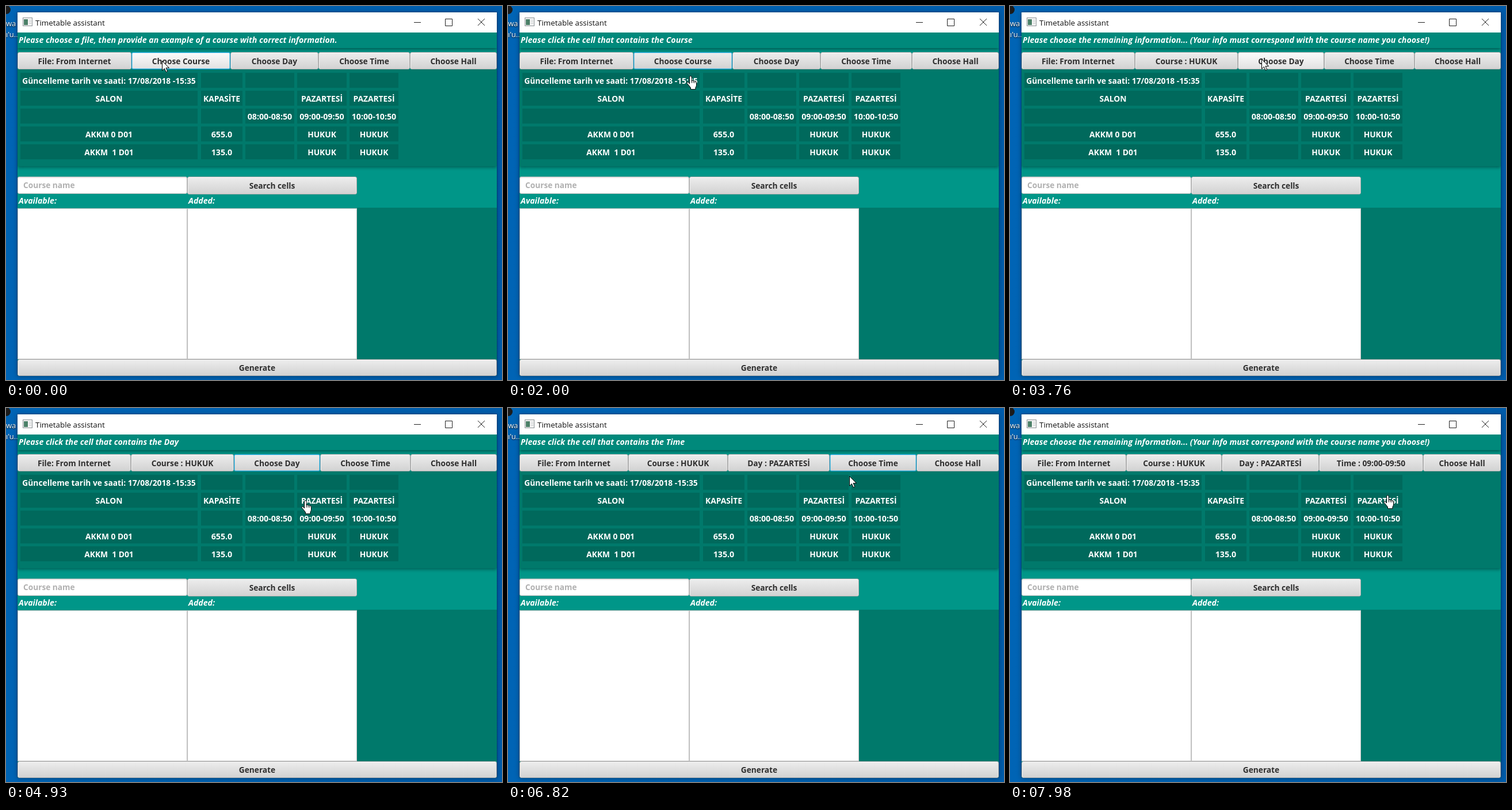
Animation of 862 by 649 pixels, one loop 8 s. Source, as an HTML page:

```html
<!DOCTYPE html>
<html lang="en">
<head>
<meta charset="utf-8">
<title>Timetable assistant</title>
<style>
  html, body { margin: 0; width: 100%; height: 100%; overflow: hidden; }
  body {
    position: relative;
    background: linear-gradient(90deg, #0064b5, #005cab);
    font: bold 13.7px "Open Sans", "Noto Sans", sans-serif;
  }
  div, svg { position: absolute; box-sizing: border-box; white-space: pre; }
  .desk { left: 0; font-weight: 400; font-size: 13px; line-height: 18px; color: #fff; text-shadow: 0 1px 2px #000; }
  .window { left: 20px; top: 11px; width: 833px; height: 630px; background: #009688; box-shadow: 0 0 0 1px rgba(0, 40, 80, .3), 0 1px 8px rgba(0, 0, 0, .4); }
  .title { left: 20px; top: 11px; width: 833px; height: 35px; background: #fff; }
  .caption { left: 51px; top: 19px; font-weight: 400; font-size: 13.4px; line-height: 20px; color: #111; }
  .clip { left: 20px; top: 46px; width: 833px; height: 595px; overflow: hidden; }
  .bar { left: 0; top: 0; width: 833px; height: 27px; background: #00897b; box-shadow: 0 2px 6px rgba(0, 0, 0, .45); }
  .table { left: 0; top: 64px; width: 833px; height: 168px; background: #00796b; box-shadow: 0 2px 6px rgba(0, 0, 0, .4); }
  .side { left: 590px; top: 304px; width: 243px; height: 263px; background: #00796b; }
  .note { color: #fff; font-style: italic; font-size: 14.17px; line-height: 20px; left: 22px; }
  .cell, .button { display: flex; align-items: center; justify-content: center; }
  .cell { background: #00695c; color: #fff; font-size: 13.8px; }
  .cell.digits { font-size: 14.2px; }
  .button {
    border: 1px solid #adadad; border-radius: 3px; color: #2e2e2e;
    background: linear-gradient(#ededed, #d2d2d2);
    box-shadow: inset 0 1px #f8f8f8, inset 1px 0 #f0f0f0, inset -1px 0 #e4e4e4;
  }
  .hover { background: linear-gradient(#fbfbfb, #e2e2e2); }
  .press { background: linear-gradient(#d4d4d4, #bcbcbc); box-shadow: none; }
  .focus { border-color: #039ed3; box-shadow: inset 0 0 0 1px rgba(3, 158, 211, .3); }
  .field { background: #fff; border: 1px solid #c0c0c0; }
  .input { border-radius: 3px; color: #b0b0b0; line-height: 28px; padding-left: 9px; box-shadow: inset 0 1px 2px #ddd; }
  #cursor { left: 0; top: 0; overflow: visible; }
</style>
</head>
<body>
<div style="left:-7px;top:-1px;width:15px;height:15px;border-radius:50%;background:#1b1b1b"></div>
<div class="desk" style="top:21px">wa</div>
<div class="desk" style="top:40px">ı'u...</div>

<div class="window"></div>
<div class="title"></div>
<svg width="862" height="46" fill="none" stroke="#222">
  <rect x="29.5" y="20.5" width="16" height="14" fill="#f4f4f4" stroke="#8c9296"/>
  <rect x="31" y="23" width="7" height="10" fill="#4c8068" stroke="none"/>
  <path d="M40 24.5h4M40 27.5h4M40 30.5h4" stroke="#c5c9cc"/>
  <path d="M709 28.5h12M763.5 22.5h12v12h-12zM820 22l12 12M832 22l-12 12"/>
</svg>
<div class="caption">Timetable assistant</div>
<div class="clip">
  <div class="table"></div>
  <div class="bar"></div>
  <div class="side"></div>
</div>
<div id="message" class="note" style="top:49px"></div>
<div id="cells"></div>
<div id="steps"></div>
<div id="form"></div>
<div class="note" style="top:328px">Available:</div>
<div class="note" style="top:328px;left:317px">Added:</div>

<svg id="cursor" width="20" height="26" fill="#fff" stroke="#000" stroke-linejoin="round">
  <path id="arrow" d="M.5.5V17l3.9-3.6 2.7 6.2 2.6-1.1L7 12.4h5.4z"/>
  <g id="hand" transform="translate(-8)">
    <path d="M5.5 14V2.4a1.8 1.8 0 0 1 3.6 0V8.6c1.2-.9 2.6-.5 3 .5c1.2-.6 2.4-.2 2.7.7c1.4-.4 2.7.2 2.7 1.8v4.4c0 2-1 3.2-1.6 4.6v3H7.5v-2.6C6 18.5 3 15.5 1.2 13.2c-.9-1.4.6-2.8 2-1.9z"/>
    <path d="M9.1 8.6v4M12.1 9.3v3.3M14.8 10.2v2.6" fill="none"/>
  </g>
</svg>

<script>
const LOOP = 8000;
const $ = id => document.getElementById(id);

function box(parent, cls, x, y, w, h, text = "") {
  const el = document.createElement("div");
  el.className = cls;
  el.style.cssText = `left:${x}px;top:${y}px;width:${w}px;height:${h}px`;
  el.textContent = text;
  parent.append(el);
  return el;
}

// Timetable grid
const cols = [[25, 308], [339, 72], [416, 85], [506, 86], [597, 85]];
const rowTop = r => 116 + r * 31;
const cellHeight = 26;
const grid = [
  ["Güncelleme tarih ve saati: 17/08/2018 -15:35"],
  ["SALON", "KAPASİTE", "", "PAZARTESİ", "PAZARTESİ"],
  ["", "", "08:00-08:50", "09:00-09:50", "10:00-10:50"],
  ["AKKM 0 D01", "655.0", "", "HUKUK", "HUKUK"],
  ["AKKM  1 D01", "135.0", "", "HUKUK", "HUKUK"]
];
grid.forEach((row, r) => cols.forEach(([x, w], c) => {
  const text = row[c] || "";
  box($("cells"), /^\d/.test(text) ? "cell digits" : "cell", x, rowTop(r), w, cellHeight, text);
}));
const overCell = (x, y) =>
  cols.some(([left, w]) => x >= left && x < left + w) &&
  grid.some((_, r) => y >= rowTop(r) && y < rowTop(r) + cellHeight);

// Lower form
box($("form"), "field input", 20, 296, 295, 30, "Course name");
box($("form"), "button", 315, 296, 295, 31, "Search cells");
box($("form"), "field", 20, 351, 295, 262);
box($("form"), "field", 315, 351, 295, 262);
box($("form"), "button", 20, 613, 833, 29, "Generate");

// Step buttons: edges shift as the labels grow
const edges = [
  [20, 218, 390, 543, 702, 853],
  [20, 217, 396, 546, 703, 853],
  [20, 209, 382, 559, 710, 853],
  [20, 202, 368, 537, 718, 853]
];
const open = ["File: From Internet", "Choose Course", "Choose Day", "Choose Time", "Choose Hall"];
const done = ["", "Course : HUKUK", "Day : PAZARTESİ", "Time : 09:00-09:50"];
const buttons = open.map(() => box($("steps"), "button", 0, 80, 0, 30));

const intro = "Please choose a file, then provide an example of a course with correct information.";
const remaining = "Please choose the remaining information... (Your info must correspond with the course name you choose!)";
const ask = what => "Please click the cell that contains the " + what;

// [start, message, steps done, active button, its look]
const scenes = [
  [0, intro, 0, 1, "hover focus"],
  [1220, intro, 0, 1, "press focus"],
  [1370, ask("Course"), 0, 1, "hover focus"],
  [2000, ask("Course"), 0, 1, "focus"],
  [2910, remaining, 1, 0, ""],
  [3600, remaining, 1, 2, "hover"],
  [4080, remaining, 1, 2, "press focus"],
  [4160, ask("Day"), 1, 2, "hover focus"],
  [4300, ask("Day"), 1, 2, "focus"],
  [5090, remaining, 2, 0, ""],
  [6270, remaining, 2, 3, "hover"],
  [6420, remaining, 2, 3, "press focus"],
  [6580, ask("Time"), 2, 3, "hover focus"],
  [6820, ask("Time"), 2, 3, "focus"],
  [7740, remaining, 3, 0, ""]
];

// Pointer moves: [first step, last step, step count, x, y]
const home = [271, 95];
const moves = [
  [2000, 2000, 1, 318, 121],
  [2080, 2680, 9, 526, 223],
  [3140, 3760, 9, 437, 92],
  [4230, 4540, 5, 513, 164],
  [4700, 4930, 4, 521, 160],
  [5330, 5560, 4, 591, 125],
  [5660, 5800, 3, 604, 103],
  [6820, 6820, 1, 593, 118],
  [6890, 7060, 3, 546, 212],
  [7200, 7430, 4, 543, 192],
  [7820, 7980, 3, 657, 151]
];
const ease = p => p * p * (3 - 2 * p);

function pointerAt(t) {
  let [x, y] = home;
  for (const [first, last, count, toX, toY] of moves) {
    if (t < first) break;
    const gap = (last - first) / (count - 1) || 1;
    const step = Math.min(count, Math.floor((t - first) / gap + 1e-6) + 1);
    const p = ease(step / count);
    x += (toX - x) * p;
    y += (toY - y) * p;
  }
  return [Math.round(x), Math.round(y)];
}

let shown;
function showScene(scene) {
  if (scene === shown) return;
  shown = scene;
  const [, message, count, active, look] = scene;
  $("message").textContent = message;
  buttons.forEach((el, i) => {
    const left = edges[count][i];
    el.style.left = left + "px";
    el.style.width = edges[count][i + 1] - left + "px";
    el.textContent = i && i <= count ? done[i] : open[i];
    el.className = "button " + (i === active ? look : "");
  });
}

const start = performance.now();
function draw() {
  const t = (performance.now() - start) % LOOP;
  showScene(scenes.findLast(s => s[0] <= t));
  const [x, y] = pointerAt(t);
  const hand = overCell(x, y);
  $("cursor").style.transform = `translate(${x}px, ${y}px)`;
  $("hand").style.display = hand ? "" : "none";
  $("arrow").style.display = hand ? "none" : "";
  requestAnimationFrame(draw);
}
draw();
</script>
</body>
</html>
```
